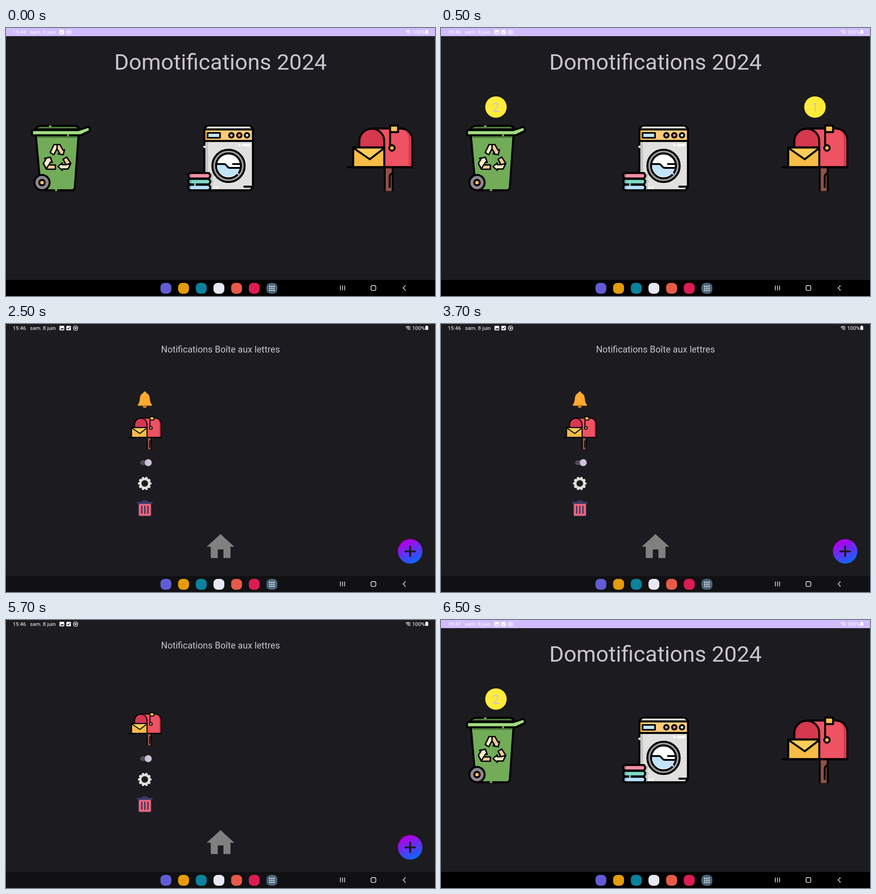
Recreate the animation shown at these times as an HTML page. Size 947 by 592 pixels, loop 8000 ms.

```html
<!DOCTYPE html>
<html lang="fr">
<head>
<meta charset="utf-8">
<title>Domotifications 2024</title>
<style>
html, body { margin: 0; width: 100%; height: 100%; overflow: hidden; background: #1c1b1f; }
svg { display: block; width: 100%; height: 100%; }
text { font-family: Roboto, sans-serif; fill: #cac4d0; }
.mid { text-anchor: middle; }
.status { --bar: #d0bcff; }
.dark .status { --bar: #1c1b1f; }
.status text { font-size: 11.7px; fill: #fff; }
.ink { stroke: #000; stroke-width: 4.3; stroke-linejoin: round; stroke-linecap: round; }
.line { fill: none; }
.white { fill: none; stroke: #fff; stroke-width: 1.4; }
.hole { fill: none; stroke: var(--bar); stroke-width: 1.4; }
</style>
</head>
<body>
<svg id="stage" viewBox="0 0 947 592">
  <defs>
    <linearGradient id="glow" x1=".3" y1="0" x2=".75" y2="1">
      <stop offset=".1" stop-color="#b000ea"/>
      <stop offset=".95" stop-color="#0b68ff"/>
    </linearGradient>
    <g id="mailbox" class="ink">
      <path d="M836 309V360H853.500V309Z" fill="#8f5148" stroke="none"/>
      <path class="line" stroke-linecap="butt" d="M836 309V360.500M853.500 309V360.500M847 353V331Q847 322 853 321"/>
      <path d="M807 222H871A26 26 0 0 1 897 248V307.500H835Z" fill="#ee5263"/>
      <path d="M880 225.500A24 24 0 0 1 895 248V305.500H889V248Q889 234 880 225.500Z" fill="#d5384f" stroke="none"/>
      <path d="M780 264V250A27.500 27.500 0 0 1 835 250V307H780Z" fill="#d5384f"/>
      <path d="M766.500 264H835V307.500H766.500Z" fill="#f7bc45"/>
      <path d="M767 265L803 290L834 266" fill="#ffcd57"/>
      <path class="line" d="M754.500 307.500H897M766.500 264H835"/>
      <path d="M848 260V215.500H865.500V230H848" fill="#ffc44d"/>
      <circle cx="852" cy="265" r="6" fill="#f7bc45"/>
    </g>
  </defs>

  <g class="status">
    <path d="M0 0H947V18H0Z" fill="var(--bar)"/>
    <text id="clock" x="15" y="13"></text>
    <text x="53" y="13">sam. 8 juin</text>
    <g id="photo">
      <rect x="118" y="4" width="10.500" height="10" rx="1.500" fill="#fff"/>
      <path d="M119.500 12L122 9L123.500 10.500L125.500 8L127.500 12Z" fill="var(--bar)"/>
    </g>
    <g id="badges">
      <rect x="118" y="4" width="10" height="10" rx="1.500" fill="#fff"/>
      <path class="hole" d="M120 9L122.300 11.300L126 7"/>
      <circle class="white" cx="138.500" cy="9" r="4.900"/>
      <path d="M136 8Q137 6 138.500 7.700Q140 6 141 8Q141 9.500 138.500 11.500Q136 9.500 136 8Z" fill="#fff"/>
    </g>
    <path class="white" d="M882.500 7.500Q887.500 3 892.500 7.500M884.500 9.700Q887.500 7 890.500 9.700"/>
    <path d="M886 11.500Q887.500 10 889 11.500L887.500 13Z" fill="#fff"/>
    <path d="M890 13V10M892.300 13V10" stroke="#fff"/>
    <text x="896.500" y="13">100%</text>
    <path d="M927.300 4.500V3.500H930.300V4.500Q932 4.500 932 6V11.500Q932 13 930.500 13H927Q925.600 13 925.600 11.500V6Q925.600 4.500 927.300 4.500Z" fill="#fff"/>
  </g>

  <g id="home">
    <text class="mid" x="473.500" y="92" font-size="49">Domotifications 2024</text>

    <g id="binCount">
      <circle cx="121.300" cy="174.600" r="23.700" fill="#ffeb3b"/>
      <text class="mid" x="121.300" y="184.500" font-size="27">2</text>
    </g>
    <g id="mailCount">
      <circle cx="825.500" cy="174.600" r="23.700" fill="#ffeb3b"/>
      <text class="mid" x="825.500" y="184.500" font-size="27">1</text>
    </g>

    <g class="ink">
      <path d="M66 224Q68 216 78 216H152Q160 217 161 224Z" fill="#54813f"/>
      <path d="M66 237H160L152 351Q151 358.500 146 358.500H84Q77 358 76 350Z" fill="#72ac58"/>
      <path d="M68 240H158L157.800 243H68.200Z" fill="#54813f" stroke="none"/>
      <path d="M60 225.500H160L180 219Q183 218 184 221L185.500 225Q186 227 184 228L165 237H60Q57.500 237 57.500 234.500V228Q57.500 225.500 60 225.500Z" fill="#a0dd82"/>
      <path d="M95 217H100M135 237H139M108 358H113" stroke="#72ac58" stroke-linecap="butt"/>
      <circle cx="79.500" cy="341.500" r="16.800" fill="#8d858b"/>
      <circle cx="79.500" cy="341.500" r="6" fill="#f8c25a"/>
      <g stroke-width="3">
        <path d="M106 257.500H119L126 270L129 269L126.500 280L115 278L118 275.500L112.500 267Z" fill="#fbc996"/>
        <path d="M97.500 275L106 257.500H113L112.500 267L105.500 280Z" fill="#ffe9cc"/>
        <path d="M82.500 299L95 302.500H109V312H91Q89 312 88 310Z" fill="#fbc996"/>
        <path d="M82.500 299L88 290L85 288L98 285.500L102 297L98.500 296L89 311Z" fill="#ffe9cc"/>
        <path d="M126 290L134 285L143 299L137 304.500L132.500 302Z" fill="#fbc996"/>
        <path d="M115 306L124 298V302H133L143 299L137 311.500H124V314.500Z" fill="#ffe9cc"/>
      </g>
    </g>

    <g class="ink">
      <path d="M438 222L445 215.500H538L545 222V352L539 358.500H438Z" fill="#e0e0de"/>
      <path d="M440 252H446V356H440Z" fill="#c4c4c4" stroke="none"/>
      <path d="M438 224H545V249.500H438Z" fill="#fdca77"/>
      <path d="M440.300 226.300H444V247.300H440.300Z" fill="#f4aa1c" stroke="none"/>
      <path d="M445 231.800H472.500V242.500H445Z" fill="#c1e4fb" stroke-width="3.600"/>
      <g stroke-width="4">
        <circle cx="497.500" cy="237" r="5" fill="#c1a0c8"/>
        <circle cx="515" cy="237" r="5" fill="#ef8b78"/>
        <circle cx="532" cy="237" r="5" fill="#c1e4fb"/>
      </g>
      <path d="M438 260V265" stroke="#e0e0de" stroke-linecap="butt"/>
      <path d="M513 256.500H517.500V261H513ZM521 256.500H539V261H521ZM457 350H461V355H457ZM465 350H469V355H465Z" fill="#fff" stroke="none"/>
      <path class="line" d="M526 350.500H544"/>
      <circle cx="491.200" cy="304.500" r="35.700" fill="#9c9c9c"/>
      <circle cx="491.200" cy="304.500" r="27.500" fill="#fff"/>
      <path d="M466 300.500H484L495 309H516A25.400 25.400 0 0 1 466 300.500Z" fill="#c1e4fb" stroke="none"/>
      <path class="line" stroke-width="4" d="M466 300.500H482Q484 300.500 486 303L489 306.500Q491 309 494 309H516M501 300.500H516"/>
      <path d="M508.500 318L513 323" stroke="#c1e4fb" stroke-width="3"/>
      <path d="M450 318Q459 320 458 327L455 332L459 339L455 345L458 352L454 356H448V318Z" fill="#c4c4c4" stroke="none"/>
      <g id="laundry"></g>
    </g>

    <use href="#mailbox"/>
  </g>

  <g id="settings">
    <text class="mid" x="473.500" y="63" font-size="20">Notifications Boîte aux lettres</text>
    <g id="bell" fill="#ffa931">
      <path d="M306.300 149Q309 149 309.300 152Q317 155 317.500 165Q318 174 322 178V180.500H291V178Q295 174 295.300 165Q296 155 303.300 152Q303.600 149 306.300 149Z"/>
      <path d="M301.500 181.500H311Q310 185 306.300 185Q302.500 185 301.500 181.500Z" fill="#ff8f1f"/>
    </g>
    <use href="#mailbox" transform="translate(-104.100 97.600) scale(.4975)"/>
    <rect x="296" y="301" width="25" height="10.400" rx="5.200" fill="#514b56"/>
    <circle cx="314" cy="306.200" r="7.700" fill="#ccc2dc"/>
    <g fill="none">
      <circle cx="306.300" cy="352.200" r="9.800" stroke="#e4e4e0" stroke-width="5"/>
      <circle cx="306.300" cy="352.200" r="7.700" stroke="#a9a9a6" stroke-width="1.300"/>
      <g id="teeth" fill="#e4e4e0"></g>
    </g>
    <path d="M300 393V391.500Q300 390 302 390H311Q313 390 313 391.500V393H323.500V396.500H321V422Q321 424.500 318 424.500H295Q292 424.500 292 422V396.500H289V393Z" fill="#3e3b66"/>
    <path d="M293.500 397.500H319.700V421Q319.700 423.500 317.500 423.500H295.500Q293.500 423.500 293.500 421Z" fill="#f5657a"/>
    <path d="M299.700 402.500V418M306.500 402.500V418M313.200 402.500V418" stroke="#3e3b66" stroke-width="3.200" stroke-linecap="round"/>
    <path d="M473.500 464L504 492H495.500V517H480V498H467.500V517H452V492H443Z" fill="#808080"/>
    <circle cx="892.200" cy="502.200" r="27" fill="url(#glow)"/>
    <path d="M881.500 502.200H903M892.200 491.500V513" stroke="#1c1b1f" stroke-width="4" stroke-linecap="round"/>
  </g>

  <path id="dock" d="M0 556.600H947V592H0Z"/>
  <g id="apps"></g>
  <path class="white" d="M738.200 569V579.500M742.800 569V579.500M747.500 569V579.500M882 569L876.700 574.300L882 579.700"/>
  <rect class="white" x="805.700" y="569" width="10.700" height="10.600" rx="3.200"/>
</svg>
<script>
const $ = id => document.getElementById(id);
const show = (id, on) => $(id).style.display = on ? "" : "none";

$("laundry").innerHTML = ["#f490a4", "#7fd9c6", "#b9dffb"].map((color, i) => {
  const y = 320.3 + i * 13;
  return `<path d="M407 ${y}H448L451 ${y + 5}V${y + 7}L448 ${y + 12}H407Q402.500 ${y + 11} 402.500 ${y + 6}T407 ${y}Z" fill="${color}"/>
    <path d="M405 ${y + 6}H409" stroke="#000" stroke-opacity=".2" stroke-width="6" stroke-linecap="butt"/>`;
}).join("") + '<path d="M417 344V349" stroke="#7fd9c6" stroke-width="3.500"/>';

$("teeth").innerHTML = Array.from({ length: 10 }, (_, i) =>
  `<path d="M303.300 341.200L304 337.500H308.600L309.300 341.200Z" transform="rotate(${i * 36 + 18} 306.300 352.200)"/>`).join("");

const tiles = ["#625bd3", "#e49b0c", "#0a829d", "#e6e9f2", "#e85a48", "#dc1c54", "#4b667b"];
let apps = tiles.map((color, i) =>
  `<rect x="${341 + i * 39}" y="563" width="24" height="24" rx="9" fill="${color}"/>`).join("");
for (let i = 0; i < 9; i++)
  apps += `<circle cx="${582.5 + i % 3 * 4.5}" cy="${570.5 + Math.floor(i / 3) * 4.5}" r="1.400" fill="#fff"/>`;
$("apps").innerHTML = apps;

function draw() {
  const t = performance.now() % 8000;
  const settings = t >= 2500 && t < 6500;
  const started = t >= 500;
  $("stage").classList.toggle("dark", settings);
  $("clock").textContent = !started ? "15:44" : t < 6500 ? "15:46" : "15:47";
  $("badges").setAttribute("transform", `translate(${started ? 15.2 : 0})`);
  $("dock").setAttribute("fill", settings ? "#111113" : "#000");
  show("photo", started);
  show("home", !settings);
  show("settings", settings);
  show("binCount", started);
  show("mailCount", started && t < 2500);
  show("bell", t < 4500);
  requestAnimationFrame(draw);
}
draw();
</script>
</body>
</html>
```
